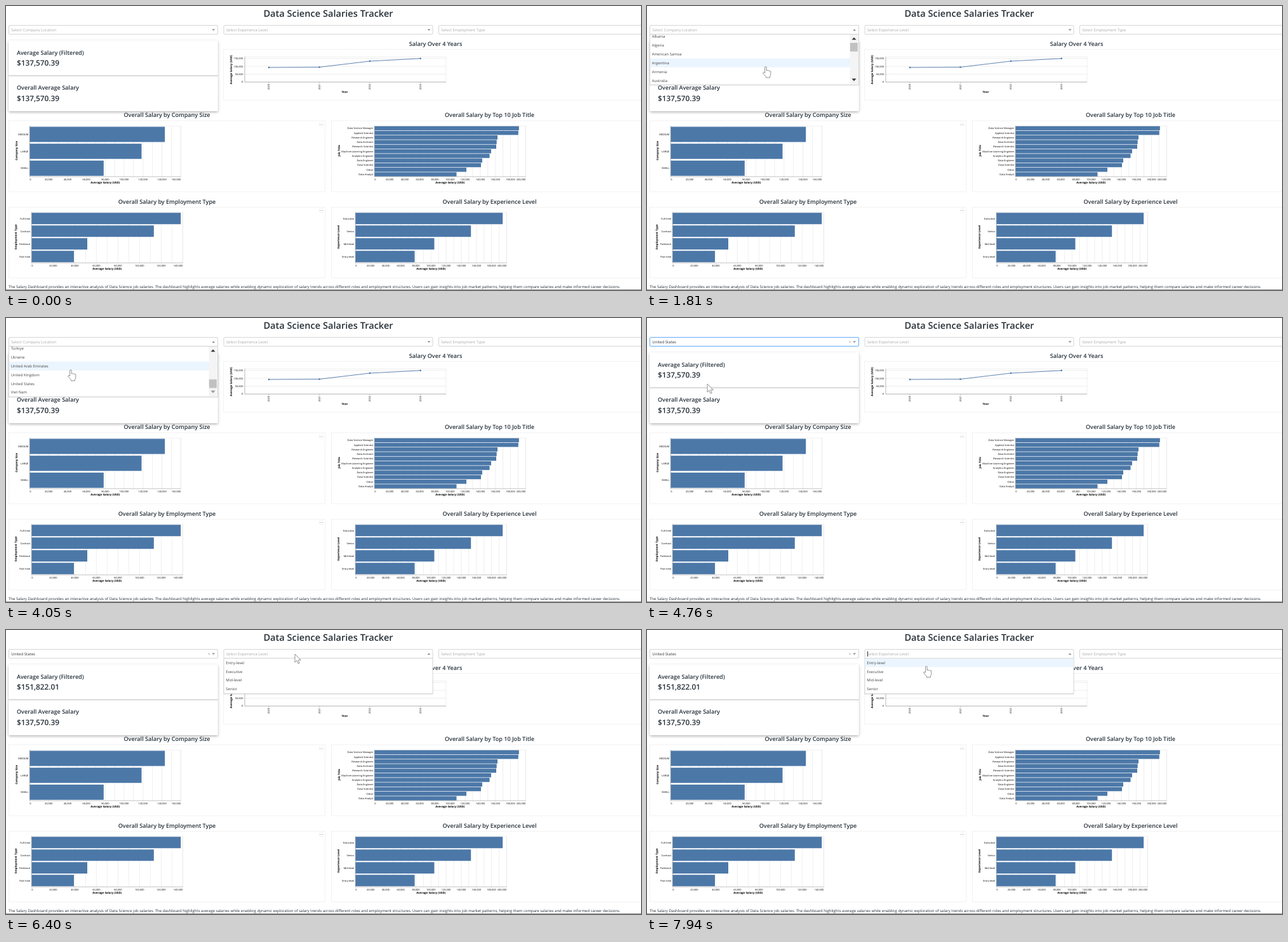
Animation of 1000 by 448 pixels, one loop 8000 ms. Source, as an HTML page:

```html
<!DOCTYPE html>
<html lang="en">
<head>
<meta charset="utf-8">
<title>Data Science Salaries Tracker</title>
<style>
  html, body { margin: 0; width: 100%; height: 100%; overflow: hidden; background: #fff; }
  svg { display: block; width: 100vw; height: 100vh; }
  text { font-family: "Open Sans", "Noto Sans", sans-serif; text-rendering: geometricPrecision; white-space: pre; }
</style>
</head>
<body>
<svg id="stage" viewBox="0 0 1000 448"></svg>
<script>
const LOOP = 8000, ROW = 13.87, LIST_TOP = 44.6, LIST_VIEW = 79.7;
const BLUE = '#4c78a8', INK = '#263038';

const countries = ('Albania,Algeria,American Samoa,Argentina,Armenia,Australia,Austria,Bahamas,Belgium,Bolivia,' +
  'Bosnia and Herzegovina,Brazil,Canada,Central African Republic,Chile,China,Colombia,Costa Rica,Croatia,Czechia,' +
  'Denmark,Egypt,Estonia,Finland,France,Germany,Ghana,Greece,Honduras,Hong Kong,Hungary,India,Indonesia,Iran,Iraq,' +
  'Ireland,Israel,Italy,Japan,Kenya,Latvia,Lithuania,Luxembourg,Malaysia,Malta,Mexico,Moldova,Morocco,Netherlands,' +
  'New Zealand,Nigeria,North Macedonia,Pakistan,Philippines,Poland,Portugal,Puerto Rico,Romania,Russian Federation,' +
  'Singapore,Slovakia,Slovenia,Spain,Sweden,Switzerland,Thailand,Türkiye,Ukraine,United Arab Emirates,' +
  'United Kingdom,United States,Viet Nam').split(',');
const levels = ['Entry-level', 'Executive', 'Mid-level', 'Senior'];
const MAX_SCROLL = countries.length * ROW - LIST_VIEW;

// Markup helpers; text is placed by the middle of its capitals
const text = (x, y, str, size, { weight = 400, fill = INK, anchor = 'start', turn = 0, id = '' } = {}) =>
  `<text id="${id}" font-size="${size}" font-weight="${weight}" fill="${fill}" text-anchor="${anchor}" ` +
  `transform="translate(${x} ${y}) rotate(${turn})" y="${size * 0.357}">${str}</text>`;
const rect = (x, y, w, h, fill, more = '') =>
  `<rect x="${x}" y="${y}" width="${w}" height="${h}" fill="${fill}" ${more}/>`;
const line = (x1, y1, x2, y2, stroke, width = 0.5) =>
  `<path d="M${x1} ${y1}L${x2} ${y2}" stroke="${stroke}" stroke-width="${width}"/>`;
const heading = (x, y, str) => text(x, y, str, 9.05, { weight: 600, anchor: 'middle' });
const label = (x, y, str, anchor, turn) => text(x, y, str, 3.95, { weight: 500, fill: '#000', anchor, turn });
const axisTitle = (x, y, str, turn) => text(x, y, str, 4.45, { weight: 700, fill: '#000', anchor: 'middle', turn });
const box = (x, y, w, h) => rect(x, y, w, h, 'none', 'stroke="#e3e3e3" stroke-width=".7" stroke-dasharray="2 1"');
const menuDots = y => `<circle cx="496.5" cy="${y}" r="3.6" fill="#fff" stroke="#eee" stroke-width=".6"/>` +
  [-1.8, 0, 1.8].map(d => `<circle cx="${496.5 + d}" cy="${y}" r=".5" fill="#999"/>`).join('');

// max is in thousands of dollars; bars hold a name and the x where the bar ends
function barChart({ x, y, max, yTitle, yTitleX, bars }) {
  const W = 238, H = 80, pitch = H / bars.length;
  let out = rect(x, y, W, H, '#fff', 'stroke="#e2e2e2" stroke-width=".5"');
  for (let k = 0; k <= max; k += 10) {
    const gx = x + W * k / max, major = k % 20 === 0;
    out += line(gx, y, gx, y + H + (major ? 2 : 0), '#ddd');
    if (major) out += label(gx, y + H + 4, k ? `${k},000` : '0', k === 0 ? 'start' : k === max ? 'end' : 'middle');
  }
  bars.forEach(([name, end], i) => {
    const mid = y + (i + 0.5) * pitch;
    out += rect(x, mid - pitch * 0.45, end - x, pitch * 0.9, BLUE) + label(x - 2, mid, name, 'end');
  });
  return out + line(x, y, x, y + H, '#888') + line(x, y + H, x + W, y + H, '#999') +
    axisTitle(x + W / 2, y + H + 9.4, 'Average Salary (USD)') + axisTitle(yTitleX, y + H / 2 - 1, yTitle, -90);
}

function lineChart() {
  const years = [414, 493.5, 573, 652.7];
  let out = box(342.5, 68.5, 700, 80) + rect(376, 80, 317, 40, '#fff', 'stroke="#ddd" stroke-width=".5"');
  ['0', '50,000', '100,000', '150,000'].forEach((str, i) => {
    const y = 120 - i * 12.45;
    out += line(374, y, 693, y, '#ddd') + label(373, y, str, 'end');
  });
  years.forEach((x, i) => out += line(x, 120, x, 122, '#888') + label(x, 123, String(2020 + i), 'end', -90));
  return out + line(376, 120, 693, 120, '#888') + line(376, 80, 376, 120, '#888') +
    axisTitle(533.5, 135.5, 'Year') + axisTitle(354, 100.5, 'Average Salary (USD)', -90) +
    ['All', 'Picked'].map((name, n) => {
      const ys = n ? [84.6, 86.3, 83.3, 81] : [97, 96.5, 87, 82.8];
      return `<g id="line${name}"><path d="M${years.map((x, i) => x + ' ' + ys[i]).join('L')}" fill="none" stroke="${BLUE}" stroke-width=".9"/>` +
        years.map((x, i) => `<circle cx="${x}" cy="${ys[i]}" r="1.3" fill="${BLUE}"/>`).join('') + '</g>';
    }).join('');
}

const selectBox = (x, id, placeholder) =>
  rect(x + 0.5, 30.5, 329, 14, '#fff', `id="${id}Box" rx="1.5" stroke="#ccc" stroke-width=".8"`) +
  text(x + 4.3, 37.6, placeholder, 6.05, { fill: '#aaa', id: id + 'Text' }) +
  `<path id="${id}Arrow" fill="#888"/>`;

const card = (y, title, id) =>
  rect(4.5, y, 329, 55.5, '#fff', 'rx="1.5" filter="url(#shade)"') +
  text(17, y + 18.8, title, 9.05, { weight: 600 }) +
  text(17, y + 35.7, '$137,570.39', 11.8, { weight: 600, id });

const panel = (id, x, h, items, extra = '') =>
  `<g id="${id}">` + rect(x + 0.5, 44.5, 329, h, '#fff', 'stroke="#ccc" stroke-width=".8" filter="url(#soft)"') +
  `<clipPath id="${id}Clip">${rect(x, LIST_TOP, 330, h - 0.4, '#000')}</clipPath><g clip-path="url(#${id}Clip)"><g id="${id}List">` +
  rect(x + 0.9, LIST_TOP, 328.2, ROW, '#ebf5ff', `id="${id}Hover"`) +
  items.map((s, i) => text(x + 3.8, +(LIST_TOP + (i + 0.5) * ROW).toFixed(2), s, 5.95, { fill: '#444' })).join('') +
  `</g></g>${extra}</g>`;

const scrollbar = rect(319.5, 45, 13, 79, '#f4f4f4') + rect(319.8, 58, 12, 13.6, '#c1c1c1', 'id="thumb"') +
  '<path id="upArrow" d="M322.5 53.2h7l-3.5-3.8z"/><path id="downArrow" d="M322.5 114.6h7l-3.5 3.8z"/>';

const about = 'The Salary Dashboard provides an interactive analysis of Data Science job salaries. The dashboard highlights ' +
  'average salaries while enabling dynamic exploration of salary trends across different roles and employment structures. ' +
  'Users can gain insights into job market patterns, helping them compare salaries and make informed career decisions.';

document.getElementById('stage').innerHTML = `<defs>
  <filter id="shade" x="-5%" y="-20%" width="110%" height="150%"><feDropShadow dx="0" dy="1.6" stdDeviation="2" flood-opacity=".32"/></filter>
  <filter id="soft" x="-5%" y="-10%" width="110%" height="130%"><feDropShadow dx="0" dy=".6" stdDeviation=".6" flood-opacity=".12"/></filter></defs>` +
  rect(0, 0, 1000, 448, '#fff') +
  text(507.5, 12, 'Data Science Salaries Tracker', 14.6, { weight: 600, anchor: 'middle' }) +
  selectBox(4, 'place', 'Select Company Location') +
  selectBox(342.5, 'level', 'Select Experience Level') +
  selectBox(681, 'kind', 'Select Employment Type') +
  text(319.5, 37.4, '×', 6.5, { fill: '#999', anchor: 'middle', id: 'clear' }) +
  heading(676.5, 60, 'Salary Over 4 Years') + lineChart() +
  card(54.5, 'Average Salary (Filtered)', 'filtered') + card(110.3, 'Overall Average Salary', 'overall') +
  line(4.5, 110.1, 333.5, 110.1, '#bbb', 0.8) +
  box(4.5, 181, 498, 112) + box(512.5, 181, 600, 112) + box(4.5, 317.5, 498, 111.5) + box(512.5, 317.5, 600, 111.5) +
  menuDots(187) + menuDots(322.5) +
  heading(253.5, 172, 'Overall Salary by Company Size') +
  heading(761.5, 172, 'Overall Salary by Top 10 Job Title') +
  heading(253.5, 308.3, 'Overall Salary by Employment Type') +
  heading(761.5, 308.3, 'Overall Salary by Experience Level') +
  barChart({ x: 37.3, y: 189.2, max: 160, yTitle: 'Company Size', yTitleX: 16,
    bars: [['MEDIUM', 250.2], ['LARGE', 213.5], ['SMALL', 153.8]] }) +
  barChart({ x: 580.3, y: 189.2, max: 200, yTitle: 'Job Title', yTitleX: 524,
    bars: [['Data Science Manager', 807.8], ['Applied Scientist', 806.8], ['Research Engineer', 774], ['Data Architect', 772.7],
      ['Research Scientist', 772], ['Machine Learning Engineer', 764], ['Analytics Engineer', 761.5], ['Data Engineer', 750],
      ['Data Scientist', 748], ['Other', 725], ['Data Analyst', 709.5]] }) +
  barChart({ x: 40.3, y: 325.2, max: 140, yTitle: 'Employment Type', yTitleX: 15.5,
    bars: [['Full-time', 275.2], ['Contract', 232.8], ['Freelance', 128], ['Part-time', 107]] }) +
  barChart({ x: 550.3, y: 325.2, max: 200, yTitle: 'Experience Level', yTitleX: 523.5,
    bars: [['Executive', 782.2], ['Senior', 732.2], ['Mid-level', 674.5], ['Entry-level', 643.6]] }) +
  text(4, 442.5, about, 6.015) + line(0, 447.5, 1000, 447.5, '#777', 0.8) +
  panel('places', 4, 79.7, countries, scrollbar) + panel('levels', 342.5, 56, levels) +
  line(347.5, 33.5, 347.5, 42, '#222', 0.9).replace('<path', '<path id="caret"') +
  `<g id="cursor" fill="#fff" stroke="#666" stroke-width=".7" stroke-linejoin="round">
    <path id="pointer" d="M0 0V13l3-2.9 2 4.9 2.2-.9-2-4.7h4.1z"/>
    <path id="hand" d="M-1.4 9.5V1a1.3 1.3 0 0 1 2.6 0v5q1.3-1.2 2.4.2 1.3-1 2.3.4 1.7-.8 1.9 1v3.6q0 2.4-1.3 3.8v2h-6.2v-1.6L-4 10.6q-1-1.9.8-2z"/></g>`;

const $ = id => document.getElementById(id);
const set = (id, name, value) => $(id).setAttribute(name, value);
const show = (id, on) => set(id, 'display', on ? 'inline' : 'none');

// The screen refreshes in bursts: start, end, number of refreshes
const bursts = [[150, 850, 8], [960, 1080, 3], [1240, 1670, 6], [1810, 2610, 10], [2700, 3400, 8], [3520, 3660, 3],
  [3800, 4520, 9], [4670, 5410, 9], [5490, 5760, 4], [5900, 6660, 9], [6740, 7020, 4], [7160, 7940, 9]];
const cursorKeys = [[150, 430, 300], [850, 200, 48], [1080, 190, 38], [1240, 190, 40], [1670, 187, 96], [1810, 187, 96],
  [2610, 170, 100], [3100, 164, 101], [3400, 164, 101], [3660, 150, 95], [3980, 102, 82], [4060, 102, 82], [4520, 95, 104],
  [4670, 95, 104], [5410, 213, 98], [5760, 300, 75], [6200, 455, 38], [6400, 455, 38], [6660, 455, 60], [7020, 455, 85],
  [7160, 455, 85], [7500, 452, 97], [7940, 440, 57.5]];
const scrollKeys = [[1670, 0], [1810, 3.5], [2610, 520], [2700, 560], [3100, 881], [3400, MAX_SCROLL]];

function refreshTime(t) {
  const burst = bursts.filter(b => b[0] <= t).pop();
  if (!burst) return 0;
  const [start, end, count] = burst, step = (end - start) / (count - 1);
  return t >= end ? end : start + Math.floor((t - start) / step + 1e-6) * step;
}

function track(keys, t) {
  const next = keys.findIndex(k => k[0] > t);
  if (next < 0) return keys[keys.length - 1].slice(1);
  if (next === 0) return keys[0].slice(1);
  const a = keys[next - 1], b = keys[next], u = (t - a[0]) / (b[0] - a[0]), e = u * u * (3 - 2 * u);
  return a.slice(1).map((v, i) => v + (b[i + 1] - v) * e);
}

function drawSelect(id, x, open) {
  set(id + 'Arrow', 'd', open ? `M${x - 2.4} 38.9h4.8l-2.4-2.5z` : `M${x - 2.4} 36.5h4.8l-2.4 2.5z`);
}

function drawPanel(id, open, scroll, y, hoverable, count) {
  const index = Math.floor((y - LIST_TOP + scroll) / ROW);
  const over = open && hoverable && y > LIST_TOP && index < count;
  show(id, open);
  show(id + 'Hover', over);
  set(id + 'Hover', 'y', LIST_TOP + index * ROW);
  set(id + 'List', 'transform', `translate(0 ${-scroll})`);
  return over;
}

function render(now) {
  const t = refreshTime(now % LOOP);
  const [x, y] = track(cursorKeys, t), [scroll] = track(scrollKeys, t);
  const placeOpen = t >= 1080 && t < 4670, levelOpen = t >= 6300;
  const picked = t >= 4670, updated = t >= 4900, scrolling = t > 1810 && t < 3660;

  drawSelect('place', 326.7, placeOpen);
  drawSelect('level', 666, levelOpen);
  drawSelect('kind', 1004.5, false);
  $('placeText').textContent = picked ? 'United States' : 'Select Company Location';
  set('placeText', 'fill', picked ? '#333' : '#aaa');
  set('placeBox', 'stroke', picked && !levelOpen ? '#3b99fc' : '#ccc');
  show('clear', picked);

  $('filtered').textContent = updated ? '$151,822.01' : '$137,570.39';
  show('lineAll', !updated);
  show('linePicked', updated);

  const overPlace = drawPanel('places', placeOpen, scroll, y, !scrolling, countries.length);
  const overLevel = drawPanel('levels', levelOpen, 0, y, true, levels.length);
  set('thumb', 'y', 58 + 38.8 * scroll / MAX_SCROLL);
  set('upArrow', 'fill', scroll > 0 ? '#333' : '#aaa');
  set('downArrow', 'fill', scroll < MAX_SCROLL ? '#333' : '#999');
  show('caret', levelOpen && Math.floor(t / 500) % 2 === 1);

  show('cursor', t >= 150);
  set('cursor', 'transform', `translate(${x} ${y})`);
  show('hand', overPlace || overLevel);
  show('pointer', !(overPlace || overLevel));
}

const began = performance.now();
function tick() {
  render(performance.now() - began);
  requestAnimationFrame(tick);
}
tick();
</script>
</body>
</html>
```
